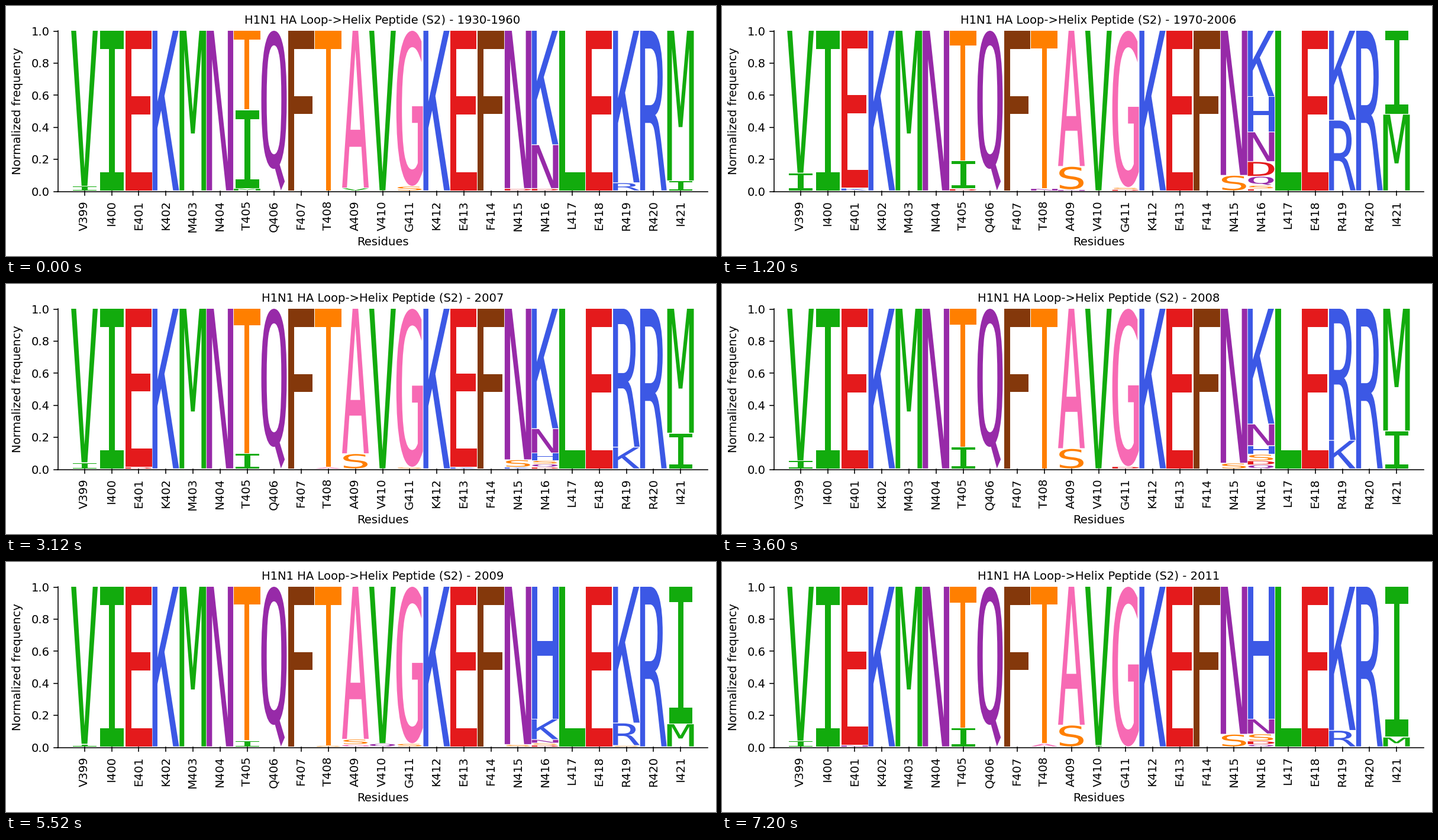
Write a matplotlib script that moves like this. It is 1200 px wide and 424 px high and loops after 8000 ms.

```python
import matplotlib.pyplot as plt
from matplotlib.animation import FuncAnimation
from matplotlib.patches import PathPatch
from matplotlib.textpath import TextPath
from matplotlib.transforms import Affine2D

W, H, DPI = 1200, 424, 100
FRAMES, INTERVAL, HOLD = 20, 400, 3

LEFT, RIGHT, TOP, BASE = 87, 1186, 42, 314
SIZE = 19.67 * 72 / DPI
LINE = 1.6 * 72 / DPI
CENTER = (LEFT + RIGHT) / 2

RESIDUES = "VIEKMNTQFTAVGKEFNNLEKRI"
LABELS = "VIEKMNTQFTAVGKEFNNLERRI"
PITCH = (RIGHT - LEFT) / (len(RESIDUES) + 1)

COLORS = {
    "AG": "#f76ab4", "CST": "#ff7f00", "DE": "#e41a1c", "FWY": "#84380b",
    "HKR": "#3c58e5", "ILMPV": "#12ab0d", "NQ": "#972aa8",
}

# Per period: column -> letters from the top down, then the shares (in
# thousandths) of all but the top letter, which takes the rest.
PERIODS = [
    ("1930-1960", {0: "VI 28", 6: "TIM 490 15", 10: "AV 17", 12: "GS 28",
                   16: "ND 14", 17: "KND 273 14", 20: "KR 50", 22: "MI 62"}),
    ("1970-2006", {0: "VI 110", 2: "EK 16", 6: "TID 175 12", 9: "TN 14",
                   10: "ASN 145 7", 12: "GSD 13 8", 16: "NS 96",
                   17: "KHNDQSE 220 185 92 56 22 12", 20: "KR 440",
                   22: "IM 477"}),
    ("2007", {0: "VI 38", 2: "ED 10", 6: "TI 94", 9: "TA 10", 10: "AS 94",
              12: "GS 10", 14: "EK 10", 16: "NSK 46 10",
              17: "KNHSQD 152 46 22 20 10", 20: "RK 135", 22: "MI 222"}),
    ("2008", {0: "VI 50", 6: "TI 136", 10: "AS 126", 12: "GD 14", 16: "NS 35",
              17: "KNHSDQ 135 54 40 26 24", 20: "RK 177", 22: "MI 236"}),
    ("2009", {0: "VI 16", 6: "TI 38", 9: "TS 8", 10: "ASG 32 15", 11: "VQ 20",
              12: "GS 20", 16: "NS 14", 17: "HKNSD 128 22 13 10",
              20: "KRS 140 8", 22: "IM 143"}),
    ("2010", {0: "VI 16", 6: "TI 68", 10: "AS 66", 11: "VI 8", 16: "NS 38",
              17: "HNSDK 57 18 12 8", 20: "KR 65", 22: "IM 28"}),
    ("2011", {0: "VI 36", 2: "EN 10", 6: "TI 118", 9: "TA 20", 10: "AS 135",
              11: "VI 8", 16: "NS 78", 17: "HNSDQ 93 44 22 14",
              20: "KR 102", 22: "IM 60"}),
]

fig = plt.figure(figsize=(W / DPI, H / DPI), dpi=DPI, facecolor="white")
ax = fig.add_axes([0, 0, 1, 1])
ax.set_xlim(0, W)
ax.set_ylim(H, 0)
ax.axis("off")


def color_of(letter):
    return next(c for group, c in COLORS.items() if letter in group)


def glyph(letter):
    """Outline of a letter with its ink box moved to the origin."""
    path = TextPath((0, 0), letter, size=100, prop={"family": "DejaVu Sans Mono"})
    box = path.get_extents()
    fit = Affine2D().translate(-box.x0, -box.y0).scale(1 / box.width, 1 / box.height)
    return fit.transform_path(path)


GLYPHS = {c: glyph(c) for group in COLORS for c in group}
INSET = {"I": (3.2, 2.2), "Q": (0.8, 1.2), "S": (2, 2), "L": (0.5, 0)}


def draw_letter(letter, x, top, bottom):
    left, right = INSET.get(letter, (0, 0))
    x0, x1 = x - 22.6 + left, x + 22.3 - right
    bottom -= min(1.3, 0.3 * (bottom - top))
    fit = Affine2D().scale(x1 - x0, top - bottom).translate(x0, bottom)
    patch = PathPatch(fit.transform_path(GLYPHS[letter]), fc=color_of(letter), lw=0)
    return ax.add_patch(patch)


def draw_column(x, spec):
    letters, *shares = spec.split()
    shares = [int(s) / 1000 for s in shares]
    top, parts = TOP, []
    for letter, share in zip(letters, [1 - sum(shares)] + shares):
        bottom = top + share * (BASE - TOP)
        parts.append(draw_letter(letter, x, top, bottom))
        top = bottom
    return parts


def line(xs, ys):
    ax.plot(xs, ys, color="black", lw=LINE, solid_capstyle="projecting", zorder=5)


def text(x, y, s, **kw):
    return ax.text(x, y, s, size=SIZE, family="DejaVu Sans", **kw)


line([LEFT + 0.5] * 2, [TOP - 0.5, BASE + 0.5])
line([LEFT, RIGHT], [BASE + 0.5] * 2)
for i in range(6):
    y = BASE + 0.5 - (BASE - TOP) * i / 5
    line([LEFT - 6, LEFT], [y, y])
    text(LEFT - 13.5, y + 7.3, f"{i / 5:.1f}", ha="right", va="baseline")

centers = [LEFT + PITCH * (i + 1) for i in range(len(RESIDUES))]
for i, x in enumerate(centers):
    line([x, x], [BASE, BASE + 6.5])
    text(x, BASE + 16, f"{LABELS[i]}{399 + i}", rotation=90, ha="center", va="top")

text(CENTER, 406, "Residues", ha="center", va="baseline")
text(29, (TOP + BASE) / 2, "Normalized frequency", rotation=90,
     ha="right", va="center")
title = text(CENTER, 29.5, "", ha="center", va="baseline")

letters = []


def update(frame):
    while letters:
        letters.pop().remove()
    period, columns = PERIODS[frame // HOLD]
    title.set_text(f"H1N1 HA Loop->Helix Peptide (S2) - {period}")
    for i, x in enumerate(centers):
        letters.extend(draw_column(x, columns.get(i, RESIDUES[i])))
    return [title, *letters]


anim = FuncAnimation(fig, update, frames=FRAMES, interval=INTERVAL,
                     init_func=lambda: update(0), repeat=True, repeat_delay=0)
plt.show()
```
